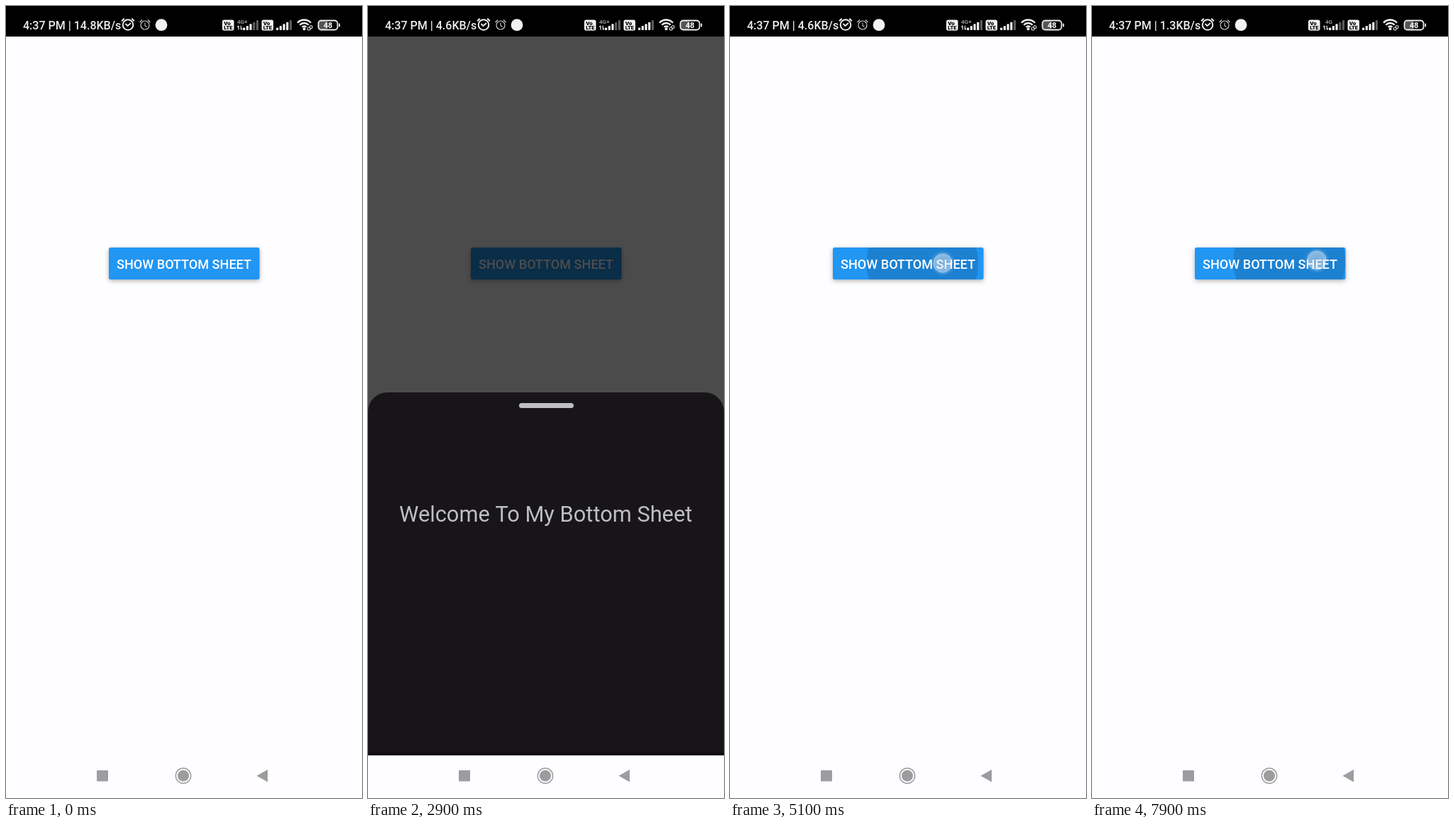
Animation, 502 px wide and 1115 px high, one loop 8 s. Source, as an HTML page with a canvas:

```html
<!DOCTYPE html>
<html lang="en">
<head>
<meta charset="utf-8">
<title>Bottom sheet</title>
<style>
  html, body { margin: 0; width: 100%; height: 100%; overflow: hidden; background: #fefdff; }
  canvas { display: block; }
</style>
</head>
<body>
<canvas id="stage" width="502" height="1115"></canvas>
<script>
const c = document.getElementById('stage').getContext('2d');
const LOOP = 8000, STEP = 100;
const HIDDEN = 1055, OPEN = 544, HEIGHT = 511;
const SANS = 'Roboto, sans-serif';

// time, top edge of the sheet
const SHEET = [
  [1400, 1055], [1500, 800], [1600, 590], [1700, 536], [1800, 533], [1900, 538], [2100, 543], [2300, 544],
  [3000, 544], [3100, 556], [3200, 600], [3300, 670], [3500, 826], [3700, 960], [3800, 1015], [3900, 1055],
  [5400, 1055], [5500, 720], [5600, 541], [5700, 533], [5800, 539], [6000, 544],
  [6500, 544], [6600, 556], [6700, 620], [6900, 820], [7000, 910], [7100, 985], [7200, 1035], [7300, 1055]
];
const VISITS = [
  { open: 1315, drag: 3000, lift: 3700, end: 3900 },
  { open: 5338, drag: 6500, lift: 7000, end: 7300 }
];
const PRESSES = [[1000, 297, 365], [4900, 300, 362], [7700, 317, 358]];

const clamp = v => Math.max(0, Math.min(1, v));
const mix = (a, b, k) => a + (b - a) * k;
const inOut = k => k < .5 ? 2 * k * k : 1 - 2 * (1 - k) ** 2;

function track(keys, t) {
  if (t <= keys[0][0]) return keys[0][1];
  for (let i = 1; i < keys.length; i++) {
    const [t0, a] = keys[i - 1], [t1, b] = keys[i];
    if (t <= t1) return mix(a, b, (t - t0) / (t1 - t0));
  }
  return keys[keys.length - 1][1];
}

function rect(x, y, w, h, fill, r = 0) {
  c.fillStyle = fill;
  c.beginPath();
  c.roundRect(x, y, w, h, r);
  c.fill();
}

function disc(x, y, r, fill) {
  c.fillStyle = fill;
  c.beginPath();
  c.arc(x, y, r, 0, 7);
  c.fill();
}

function line(path, color, width) {
  c.strokeStyle = color;
  c.lineWidth = width;
  c.stroke(new Path2D(path));
}

function ring(x, y, r, color, width) {
  c.strokeStyle = color;
  c.lineWidth = width;
  c.beginPath();
  c.arc(x, y, r, 0, 7);
  c.stroke();
}

function text(str, x, y, size, weight, fill, align = 'center') {
  c.font = `${weight} ${size}px ${SANS}`;
  c.textAlign = align;
  c.fillStyle = fill;
  c.fillText(str, x, y);
}

function alarm(x, y, r, color, width, hands) {
  c.save();
  c.translate(x, y);
  ring(0, 0, r, color, width);
  line(`M${-r - 1.5} ${-r + 2}l3.5 -3.5M${r + 1.5} ${-r + 2}l-3.5 -3.5`, color, width);
  line(hands, color, width * .9);
  c.restore();
}

function volte(x) {
  rect(x, 19.5, 16.5, 15, '#f4f4f4', 2.5);
  text('Vo', x + 7, 26.5, 8, 900, '#000');
  text('LTE', x + 8.4, 33.3, 7.5, 900, '#000');
}

function bars(x, lit) {
  for (let i = 0; i < 5; i++) {
    const h = 3.5 + i * 2.6;
    rect(x + i * 4.7, 34 - h, 3.2, h, i < lit ? '#f2f2f2' : '#5c5c5c', .8);
  }
}

function statusBar(t) {
  const speed = t < 2900 ? '14.8' : t < 6900 ? '4.6' : '1.3';
  const shift = t < 2900 ? 0 : -9;
  rect(0, 0, 502, 43, '#000');
  text(`4:37 PM | ${speed}KB/s`, 24, 32.5, 16, 500, '#eee', 'left');
  alarm(172 + shift, 26.5, 7.3, '#eee', 2, 'M-3.5 -1.5L-.5 1.5L4 -2.5');
  alarm(196 + shift, 27, 6, '#ccc', 1.2, 'M0 -3.5V.5L2.5 2.5');
  disc(219 + shift, 26.7, 8.4, '#f2f2f2');

  volte(305);
  text(t < 7700 ? '4G+' : '4G', t < 7700 ? 326 : 329, 24.5, 8, 400, '#ddd', 'left');
  line('M328 33.5V28M326.3 29.7L328 27.7M331.3 27.7V33.3M333 31.5L331.3 33.5', '#ddd', 1.3);
  bars(334, t >= 3800 && t < 6900 ? 4 : 3);
  volte(360.5);
  bars(381, 4);

  for (const r of [4, 8.5, 13]) {
    c.strokeStyle = '#f2f2f2';
    c.lineWidth = 2.3;
    c.beginPath();
    c.arc(420.5, 32.5, r, -Math.PI * .76, -Math.PI * .24);
    c.stroke();
  }
  disc(420.5, 32.2, 2, '#f2f2f2');
  disc(428.5, 31, 4.6, '#000');
  ring(427.2, 32, 2, '#ccc', 1.2);
  ring(430, 29.6, 2, '#ccc', 1.2);

  rect(441, 21, 13, 12, '#555', 3);
  c.strokeStyle = '#eee';
  c.lineWidth = 1.8;
  c.beginPath();
  c.roundRect(440.5, 20.5, 27, 13, 4);
  c.stroke();
  rect(469.3, 24.5, 1.8, 5, '#eee', 1);
  text('48', 454, 31, 11, 700, '#fff');
}

function button(t) {
  c.save();
  c.shadowColor = 'rgba(0,0,0,.3)';
  c.shadowBlur = 6;
  c.shadowOffsetY = 2;
  rect(145, 340, 212.5, 45, '#2196f3', 2.5);
  c.restore();

  c.save();
  c.beginPath();
  c.roundRect(145, 340, 212.5, 45, 2.5);
  c.clip();
  for (const [start, x, y] of PRESSES) {
    const age = t - start;
    if (age < 0 || age >= 700) continue;
    const k = clamp(age / 340);
    const alpha = .14 * clamp((700 - age) / 300);
    disc(mix(x, 251, k), mix(y, 362, k), 134 * k, `rgba(0,0,0,${alpha})`);
  }
  c.restore();
  text('SHOW BOTTOM SHEET', 251, 370, 18.1, 500, '#fff');
}

function sheet(top) {
  if (top >= HIDDEN) return;
  rect(0, top, 502, HEIGHT, '#171517', [27, 27, 0, 0]);
  rect(213, top + 15, 77, 7, '#bfbec1', 3.5);
  text('Welcome To My Bottom Sheet', 250.7, top + 182, 30.8, 400, '#bfbec1');
  rect(0, 1051, 502, Math.min(top + HEIGHT, HIDDEN) - 1051, '#100a10');
}

function navBar() {
  const gray = '#9d9c9e';
  rect(0, HIDDEN, 502, 60, '#fefdff');
  rect(128, 1076, 16, 15.5, gray, 1);
  ring(250, 1083.7, 10.7, gray, 1.5);
  disc(250, 1083.7, 8, gray);
  c.fillStyle = gray;
  c.fill(new Path2D('M353.5 1083.7L369 1075V1092.5Z'));
}

function touch(x, y, alpha) {
  if (alpha <= 0) return;
  const glow = c.createRadialGradient(x, y, 12, x, y, 18);
  glow.addColorStop(0, `rgba(190,215,235,${alpha * .65})`);
  glow.addColorStop(1, 'rgba(190,215,235,0)');
  c.fillStyle = glow;
  c.beginPath();
  c.arc(x, y, 18, 0, 7);
  c.arc(x, y, 13, 0, 7, true);
  c.fill('evenodd');
  const body = c.createRadialGradient(x, y, 2, x, y, 13.5);
  body.addColorStop(0, `rgba(225,225,228,${alpha * .93})`);
  body.addColorStop(1, `rgba(245,245,247,${alpha})`);
  disc(x, y, 13.5, body);
}

function draw(t) {
  const top = track(SHEET, t);
  const visit = VISITS.find(v => t >= v.open && t < v.end);

  rect(0, 0, 502, 1115, '#fefdff');
  button(t);
  if (visit) {
    const shown = clamp((HIDDEN - top) / (HIDDEN - OPEN));
    const dim = .7 * inOut(clamp((t - visit.open) / 330)) * (t > visit.drag ? shown ** 1.3 : 1);
    rect(0, 43, 502, HIDDEN - 43, `rgba(0,0,0,${dim})`);
  }
  sheet(top);
  navBar();
  statusBar(t);

  for (const [start, x, y] of PRESSES) {
    const age = t - start;
    if (age >= 0) touch(x, y, track([[0, .3], [100, .52], [300, .5], [400, .1], [500, 0]], age));
  }
  if (visit && t >= visit.drag && t < visit.lift) {
    touch(306, top + 101, t === visit.drag ? .4 : .76);
  }
}

function tick(now) {
  draw(Math.floor(now % LOOP / STEP) * STEP);
  requestAnimationFrame(tick);
}
draw(0);
requestAnimationFrame(tick);
</script>
</body>
</html>
```
